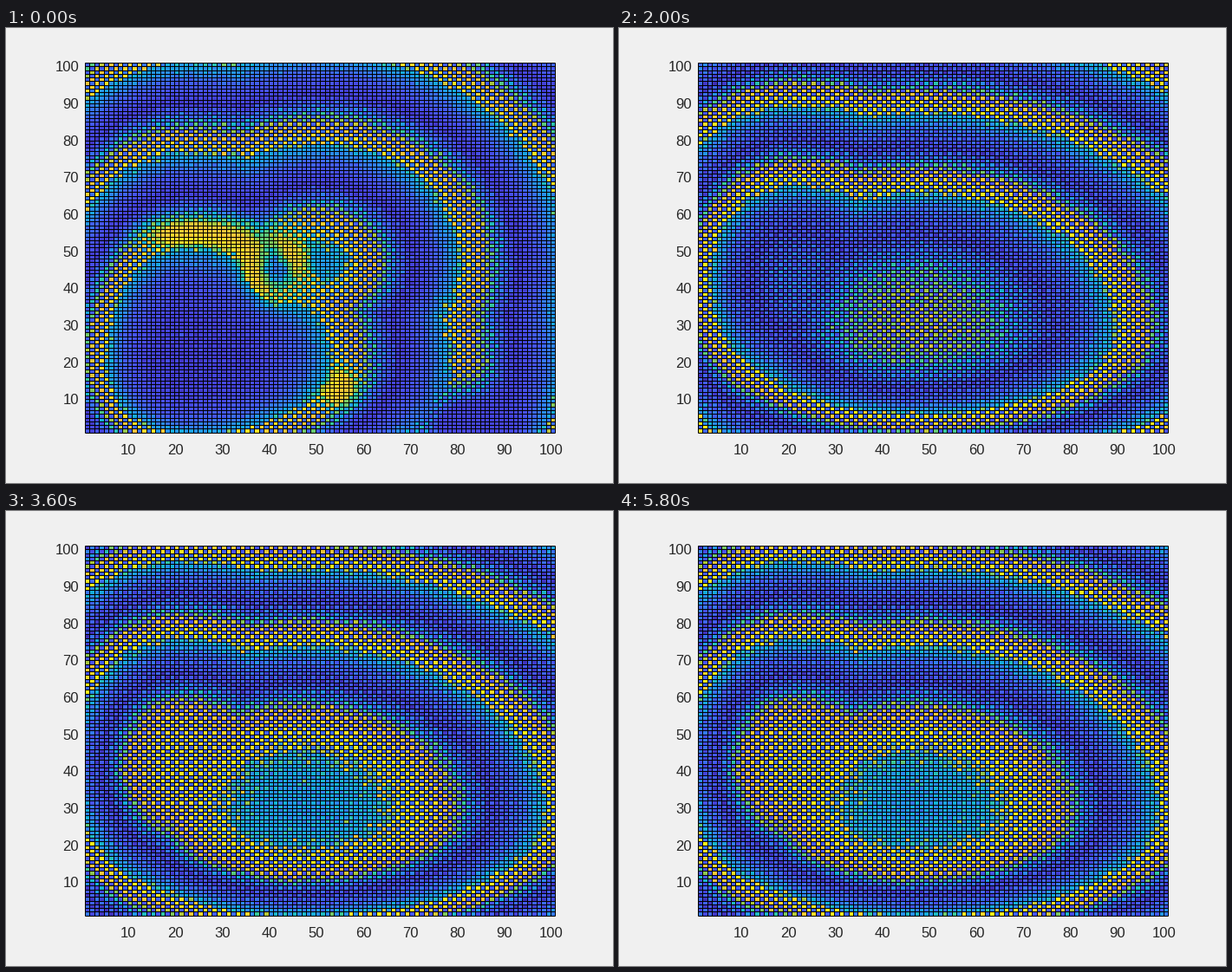
Animation, 700 px wide and 525 px high, one loop 6 s. Source, as a matplotlib script:

```python
import numpy as np
import matplotlib.pyplot as plt
from matplotlib.animation import FuncAnimation
from matplotlib.colors import LinearSegmentedColormap

W, H, DPI = 700, 525, 100
LEFT, BOTTOM, WIDTH, HEIGHT = 91, 58.4, 542.4, 426.5
N = 100
FRAMES, STEP_MS = 30, 200
TURN = 6 / 11          # wave cycles per frame
SETTLE = 4             # frames until the pattern is periodic

# Colour value over one cycle for the two checkerboard halves.
KEYS = [0, .05, .17, .37, .43, .6, .85, 1]
HOT = [.3, .52, .8, .95, .42, .2, .1, .3]
COLD = [.15, .18, .17, .25, .35, .17, .05, .15]

PARULA = LinearSegmentedColormap.from_list("parula", [
    (.2422, .1504, .6603), (.2810, .3228, .9579), (.1786, .5289, .9682),
    (.0689, .6948, .8394), (.2161, .7843, .5923), (.6720, .7793, .2227),
    (.9970, .7659, .2199), (.9769, .9839, .0805)])

cells = np.arange(N) + 1.5
X, Y = np.meshgrid(cells, cells)


def arrival(x, y, start, core, soft, length, left=1, right=1, down=1):
    """Time in cycles at which a wave born at (x, y) reaches each cell.

    Inside the core radius the medium fires almost at once; outside, the
    front moves one wave length per cycle.
    """
    dx = (X - x) * np.where(X < x, left, right)
    dy = (Y - y) * np.where(Y < y, down, 1)
    d = np.hypot(dx, dy) - core
    return start + (d + np.hypot(d, soft)) / (2 * length)


def bump(x, y, rx, ry):
    return np.exp(-((X - x) / rx) ** 2 - ((Y - y) / ry) ** 2)


rings = np.minimum(
    arrival(47, 29, .27, 22.7, 10.7, 20.5, right=.87, down=1.6),
    arrival(21, 42, .45, 15, 8, 20.5, left=1.5))
spiral = np.minimum(
    arrival(22, 20, .1, 21.4, 10, 24, left=1.9, down=1.6),
    arrival(51, 47, .45, 4.8, 6, 24, right=1.08))
spiral += .45 * bump(41, 43, 6, 8)

rng = np.random.default_rng(4)
ragged = rng.normal(0, .02, (N, N))
checker = (X + Y) % 2 == 1
solid = np.clip(1.5 * (bump(24, 55, 10, 4) + bump(40, 47, 8, 9)
                       + bump(55, 13, 4, 5)), 0, 1)
quiet = np.clip(1.6 * bump(84, 3, 11, 9), 0, 1)


def values(i):
    start = max(0, 1 - i / SETTLE)
    fronts = start * spiral + (1 - start) * rings
    phase = (i * TURN - fronts + ragged) % 1
    ripple = .06 * (1 - start)
    hot = np.interp(phase, KEYS, HOT) + ripple
    cold = np.interp(phase, KEYS, COLD) - ripple / 2
    cold += start * solid * (hot - cold)
    v = np.where(checker, hot, cold)
    return v + start * quiet * (.1 - v)


fig = plt.figure(figsize=(W / DPI, H / DPI), dpi=DPI, facecolor="#f0f0f0")
ax = fig.add_axes([LEFT / W, BOTTOM / H, WIDTH / W, HEIGHT / H])
edges = np.arange(1, N + 2)
mesh = ax.pcolormesh(edges, edges, values(0), cmap=PARULA, vmin=0, vmax=1)
line = dict(colors="black", linewidth=72 / DPI, clip_on=False)
ax.vlines(edges, 1, N + 1, **line)
ax.hlines(edges, 1, N + 1, **line)
ax.set(xlim=(1, N + 1), ylim=(1, N + 1))
ax.axis("off")

label = dict(family="Liberation Sans", size=16.67 * 72 / DPI,
             color="#262626", va="baseline")
for k in range(10, N + 1, 10):
    x = LEFT + 1 + (k - 1) * WIDTH / N
    y = BOTTOM + (k - 1) * HEIGHT / N
    fig.text(x / W, 33.5 / H, str(k), ha="center", **label)
    fig.text(84 / W, (y - 6) / H, str(k), ha="right", **label)


def update(i):
    mesh.set_array(values(i))
    return mesh,


anim = FuncAnimation(fig, update, frames=FRAMES, interval=STEP_MS,
                     repeat=True, repeat_delay=0, blit=False)
plt.show()
```
